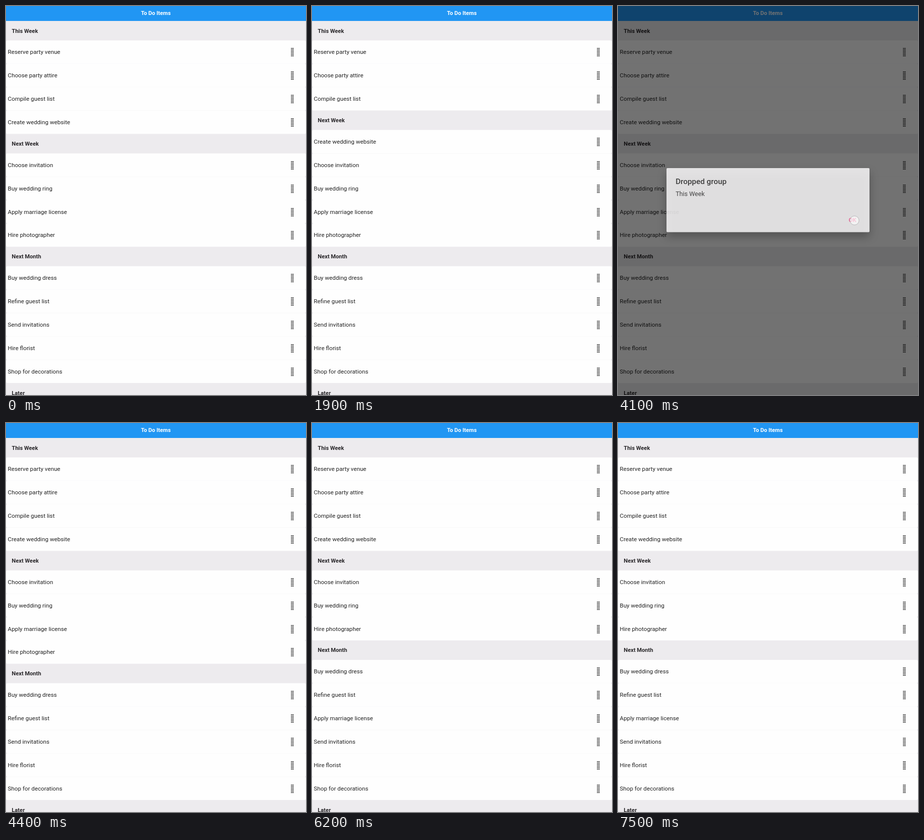
These frames come from a looping animation (600x780 px, 8000 ms). An HTML page with a canvas:

```html
<!DOCTYPE html>
<html lang="en">
<head>
<meta charset="utf-8">
<title>To Do Items</title>
<style>
html, body { margin: 0; width: 100%; height: 100%; overflow: hidden; background: #e8e6ec; }
canvas { display: block; width: 600px; height: 780px; }
</style>
</head>
<body>
<canvas id="stage" width="600" height="780"></canvas>
<script>
const ctx = document.getElementById('stage').getContext('2d');
const LOOP = 8000, STEP = 100, WIDTH = 600, HEIGHT = 780;
const BAR = 30, HEAD = 39, ROW = 46.85;
const FONT = 'Roboto, sans-serif';

const start = [
  '#This Week', 'Reserve party venue', 'Choose party attire', 'Compile guest list',
  'Create wedding website', '#Next Week', 'Choose invitation', 'Buy wedding ring',
  'Apply marriage license', 'Hire photographer', '#Next Month', 'Buy wedding dress',
  'Refine guest list', 'Send invitations', 'Hire florist', 'Shop for decorations', '#Later'
];

// shifts: when each passed entry begins to slide out of the way
const drags = [
  { from: 4, to: 5, begin: 150, time: 450, release: 750, shifts: [430] },
  { from: 5, to: 4, begin: 2650, time: 450, release: 3250, shifts: [2930] },
  { from: 8, to: 12, begin: 5154, time: 714, release: 6150, shifts: [5540, 5670, 5800, 5930] }
];
const dialogs = [
  { group: 'Next Week', show: 795, tap: 1600, hide: 1650 },
  { group: 'This Week', show: 3310, tap: 4000, hide: 4080 },
  { group: 'Next Month', show: 6210, tap: 7100, hide: 7180 }
];
const taps = [[474, 429], [473, 430], [475, 427]];
const LAG = 117, SHIFT_TIME = 150;

const clamp = v => Math.max(0, Math.min(1, v));
const ease = v => { v = clamp(v); return v * v * (3 - 2 * v); };
const mix = (a, b, k) => a + (b - a) * k;
const isHead = label => label[0] === '#';

function moved(list, from, to) {
  const copy = list.slice();
  copy.splice(to, 0, ...copy.splice(from, 1));
  return copy;
}

function layout(list) {
  const tops = {};
  let y = BAR;
  for (const label of list) {
    tops[label] = y;
    y += isHead(label) ? HEAD : ROW;
  }
  return tops;
}

function text(str, x, y, size, weight, color, align = 'left') {
  ctx.font = `${weight} ${size}px ${FONT}`;
  ctx.fillStyle = color;
  ctx.textAlign = align;
  ctx.fillText(str, x, y);
}

function box(x, y, w, h, r, color) {
  ctx.fillStyle = color;
  ctx.beginPath();
  ctx.roundRect(x, y, w, h, r);
  ctx.fill();
}

function drawGrip(y) {
  const top = Math.round(y - 8);
  ctx.fillStyle = '#222';
  for (let row = 0; row < 6; row++)
    for (let col = 0; col < 3; col++)
      ctx.fillRect(570 + col * 2, top + row * 3, 1.2, 2);
}

function drawEntry(label, top) {
  if (isHead(label)) {
    ctx.fillStyle = '#edebee';
    ctx.fillRect(0, top - 3, WIDTH, HEAD + 6);
    text(label.slice(1), 11.5, top + HEAD / 2 + 4, 11.2, 700, '#2a282b');
    return;
  }
  const mid = top + ROW / 2;
  box(0, top, WIDTH, ROW, 3, '#fefefe');
  text(label, 3.6, mid + 4, 11.72, 400, '#222');
  drawGrip(mid);
}

function drawTouch(x, y) {
  ctx.beginPath();
  ctx.arc(x, y, 9, 0, Math.PI * 2);
  ctx.fillStyle = 'rgba(255,255,255,.6)';
  ctx.fill();
  ctx.lineWidth = 1;
  ctx.strokeStyle = 'rgba(110,110,115,.38)';
  ctx.stroke();
}

function drawList(t) {
  let order = start, active = null;
  for (const d of drags) {
    if (t < d.begin) break;
    if (t < d.release) { active = d; break; }
    order = moved(order, d.from, d.to);
  }
  ctx.fillStyle = '#e8e6ec';
  ctx.fillRect(0, 0, WIDTH, HEIGHT);

  const tops = layout(order);
  let held = null;
  if (active) {
    const after = layout(moved(order, active.from, active.to));
    const dir = Math.sign(active.to - active.from);
    held = order[active.from];
    active.shifts.forEach((at, i) => {
      const label = order[active.from + dir * (i + 1)];
      tops[label] = mix(tops[label], after[label], ease((t - at) / SHIFT_TIME));
    });
    const home = tops[held];
    tops[held] = mix(home, after[held], ease((t - active.begin - LAG) / active.time));
    active.touchY = mix(home, after[held], ease((t - active.begin) / active.time)) + ROW / 2 + 7.5;
  }
  // headings first, so that the row corners show on top of them
  const still = order.filter(label => label !== held);
  still.filter(isHead).forEach(label => drawEntry(label, tops[label]));
  still.filter(label => !isHead(label)).forEach(label => drawEntry(label, tops[label]));
  if (held) drawEntry(held, tops[held]);

  ctx.fillStyle = '#2196f3';
  ctx.fillRect(0, 0, WIDTH, BAR);
  text('To Do Items', 299.7, 18, 11.1, 700, '#fff', 'center');
  if (active) drawTouch(578, active.touchY);
}

function drawDialog(t) {
  dialogs.forEach((d, i) => {
    const level = (inTime, outTime) =>
      clamp((t - d.show) / inTime) * (1 - clamp((t - d.hide) / outTime));
    const dim = 0.6 * level(180, 240);
    const alpha = level(112, 110);
    if (dim > 0) {
      ctx.fillStyle = `rgba(0,0,0,${dim})`;
      ctx.fillRect(0, 0, WIDTH, HEIGHT);
    }
    if (alpha > 0) {
      ctx.save();
      ctx.globalAlpha = alpha;
      ctx.shadowColor = 'rgba(0,0,0,.33)';
      ctx.shadowBlur = 18;
      ctx.shadowOffsetY = 9;
      box(97, 325, 406, 128.5, 2, '#fefdfe');
      ctx.shadowColor = 'transparent';
      text('Dropped group', 115.2, 356.5, 15.4, 500, '#1c1c1c');
      text(d.group, 115.2, 381, 12.7, 400, '#222');
      text('OK', 461.2, 433.3, 11.5, 500, '#f0417f');
      ctx.restore();
    }
    if (t >= d.tap && t < d.tap + 2 * STEP) drawTouch(...taps[i]);
  });
}

function frame() {
  const t = Math.floor(performance.now() % LOOP / STEP) * STEP;
  drawList(t);
  drawDialog(t);
  requestAnimationFrame(frame);
}
frame();
</script>
</body>
</html>
```
